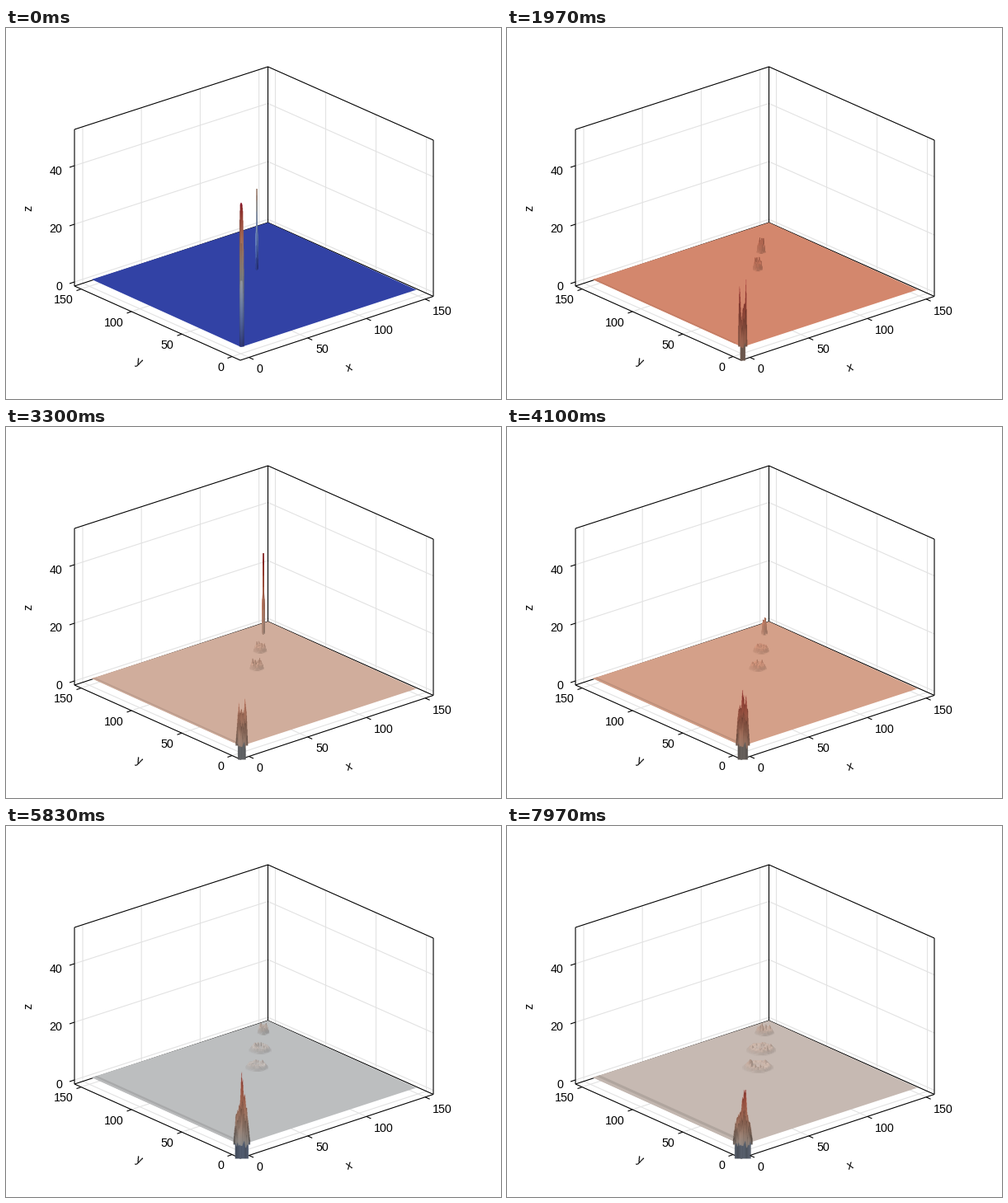
A matplotlib script that plays this animation: 600 px wide and 450 px high, repeating every 8 s.

```python
import numpy as np
import matplotlib as mpl
import matplotlib.pyplot as plt
from matplotlib.animation import FuncAnimation
from matplotlib.collections import PolyCollection

LOOP, FRAMES = 8000, 240
DPI = 100
CMAP = mpl.colormaps["coolwarm"]
LIGHT = 0.86
NEAR, FAR = 4.2, 3.55          # pixels per unit of z, front and back

KEYS = [0, 870, 1970, 3300, 4930, 6730, 7970]
DEPTH = [0, 8.7, 57, 44, 27.6, 19.5, 21.8]     # lowest point of the surface
HALF = [2.8, 5, 5.5, 7.5, 9.5, 11, 12]         # half width of the front peak
FOOT = [0, 2.8, 3.2, 5, 7.5, 9, 10]            # half width of its lower part
PEAKS = np.array([
    [150, 173, 175, 175, 175, 173, 165, 140, 90],
    [5, 30, 113, 142, 114, 113, 90, 25, 5],
    [20, 80, 62, 35, 52, 55, 60, 84, 5],
    [3, 30, 56, 48, 50, 45, 59, 50, 5],
    [4, 42, 48, 62, 107, 75, 66, 40, 4],
    [8, 30, 38, 50, 96, 68, 42, 36, 8],
    [8, 30, 36, 44, 66, 79, 38, 32, 8],
])
DROPS = [(312, 251, 3270), (308, 272, 250), (304, 293, -30)]

rng = np.random.default_rng(7)

fig = plt.figure(figsize=(600 / DPI, 450 / DPI), dpi=DPI, facecolor="white")
ax = fig.add_axes([0, 0, 1, 1])
ax.axis("off")


def px(v):
    return v * 72 / DPI


def line(*pts, color="black", width=1.1, z=1):
    x, y = zip(*pts)
    ax.plot(x, y, color=color, lw=px(width), zorder=z, snap=False,
            solid_capstyle="butt")


def between(a, b, x):
    return a[1] + (b[1] - a[1]) * (x - a[0]) / (b[0] - a[0])


def label(x, y, s, ha="center", rot=0):
    ax.text(x, y, s, ha=ha, va="center_baseline", rotation=rot,
            rotation_mode="anchor" if rot else "default",
            fontsize=px(14.2), family="Liberation Sans", zorder=9)


# box, grid, ticks
TL, TB, TR = (83, 123), (317.5, 47), (518, 136)
BL, BB, BR, BF = (83, 313), (317.5, 236), (518, 325.5), (284, 403)
GRID = "#e2e2e2"


def draw_box():
    for y, yb, yr, s in [(167, 91.5, 180.5, "40"), (238, 162, 251, "20"),
                         (308, 232, 320.5, "0")]:
        line((83, y), (317.5, yb), (518, yr), color=GRID, z=0)
        line((83, y), (77, y + 2), z=8)
        label(68, y + 5, s, "right")
    for i in range(4):
        s = str(50 * i)
        xl, xr = 93 + 71.2 * i, 509.5 - 61 * i
        fx = 294.5 + 71.2 * i
        fy = between(BF, BR, fx)
        gx = 274 - 61 * i
        gy = between(BL, BF, gx)
        yl, yr = between(BL, BB, xl), between(BB, BR, xr)
        line((xl, between(TL, TB, xl)), (xl, yl), (fx, fy), color=GRID, z=0)
        line((xr, between(TB, TR, xr)), (xr, yr), (gx, gy), color=GRID, z=0)
        line((fx, fy), (fx + 5.5, fy + 2.5), z=8)
        line((gx, gy), (gx - 5.5, gy + 2), z=8)
        label(304 + 71 * i, 412 - 23.2 * i, s, "left")
        label(264.5 - 61 * i, 410.5 - 27.2 * i, s, "right")
    line(TL, TB, TR)
    line(TL, BL)
    line(TB, BB)
    line(TR, BR)
    line(BL, BB, BR)
    line(BL, BF, BR)
    label(25.5, 218, "z", rot=90)
    label(162, 404, "y", rot=-24)
    label(416, 411, "x", rot=18)


draw_box()

# flat surface and the ripple along its left edge
LEFT, FRONT = np.array([104, 305.0]), np.array([285, 387.0])
floor = plt.Polygon([LEFT, (317.5, 236), (497.5, 317.5), FRONT], lw=0, zorder=2)
bands = [plt.Polygon([LEFT, FRONT, FRONT], lw=0, zorder=2.5) for _ in range(2)]
for patch in [floor, *bands]:
    ax.add_patch(patch)

# expanding rings: a smooth rim around a jagged crown
U, V = np.meshgrid(np.linspace(-1, 1, 25), np.linspace(-1, 1, 15))
RHO = np.hypot(U, V)
RIM = np.clip((1.02 - RHO) / 0.3, 0, 1)
RIM = RIM * RIM * (3 - 2 * RIM)
CROWN = np.exp(-((RHO - 0.52) / 0.2) ** 2)
CONE = np.clip(1 - RHO, 0, 1)
BOWL = np.exp(-(RHO / 0.4) ** 2)
NOISE = rng.random((len(DROPS), len(KEYS), *U.shape))
NOISE = (2 * NOISE + np.roll(NOISE, 1, -1) + np.roll(NOISE, 1, -2)) / 4
NOISE = (NOISE / NOISE.max()) ** 3
rings = []
for k in range(len(DROPS)):
    ring = PolyCollection([], linewidths=0.3, zorder=3 + 0.1 * k)
    ax.add_collection(ring)
    rings.append(ring)

# front peak, painted column by column in three layers
X0, X1, Y0, Y1 = 269.5, 301.5, 205, 406
XS = np.linspace(X0, X1, 96)
YS = np.linspace(Y0, Y1, 402)[:, None]
DX = XS - 285.3
STREAK = np.interp(XS, np.linspace(X0, X1, 40), rng.random(40))
JAG = 9 * np.interp(XS, np.linspace(X0, X1, 28), rng.random(28)) - 5
LAYERS = [(1, 0.86), (0.72, 0.78), (0.46, 0.9)]   # share of height, tone
BROWN = np.array([0.5, 0.42, 0.36])
peak = ax.imshow(np.zeros((402, 96, 4)), extent=(X0, X1, Y1, Y0),
                 aspect="auto", zorder=4)

ax.set_xlim(0, 600)
ax.set_ylim(450, 0)


def blend(table, t):
    p = np.interp(t, KEYS, range(len(KEYS)))
    i = min(int(p), len(KEYS) - 2)
    return table[i] * (1 - p + i) + table[i + 1] * (p - i)


def drop_height(age):
    if age < 0:
        return 0
    return 10 + 32 * np.exp(-age / 2000) + 61 * np.exp(-max(0, age - 120) / 150)


def draw_ring(k, t, level, scale):
    cx, cy, birth = DROPS[k]
    age = t - birth
    tall = drop_height(age)
    r = 1.5 + 0.0021 * age if age >= 0 else 0
    young = np.exp(-max(age, 0) / 600)
    crater = 0.36 * RIM + 0.75 * CROWN * blend(NOISE[k], t) - 0.3 * BOWL
    h = tall * (young * CONE + (1 - young) * crater)
    pts = np.stack([cx + r * U, cy + 0.34 * r * V - h], axis=-1)
    quads = np.stack([pts[:-1, :-1], pts[:-1, 1:], pts[1:, 1:], pts[1:, :-1]], 2)
    mid = (h[:-1, :-1] + h[1:, 1:] + h[:-1, 1:] + h[1:, :-1]) / 4
    gx = h[:-1, 1:] - h[:-1, :-1]
    gy = h[1:, :-1] - h[:-1, :-1]
    shade = (1 + 0.06 * RIM[:-1, :-1] - 0.26 * np.tanh(np.hypot(gx, gy) / 4)
             + 0.08 * np.tanh(gx / 3))
    rgb = CMAP(level + mid / FAR * scale)[..., :3] * (LIGHT * shade)[..., None]
    rgb = np.clip(rgb, 0, 1).reshape(-1, 3)
    rings[k].set_verts(quads.reshape(-1, 4, 2))
    rings[k].set_facecolor(rgb)
    rings[k].set_edgecolor(rgb)


def draw_peak(t, tops, level, scale):
    half, foot = np.interp(t, KEYS, HALF), np.interp(t, KEYS, FOOT)
    nodes = half * np.linspace(-1, 1, len(tops))
    hull = np.interp(DX, nodes, tops, left=0, right=0)
    rough = min(t / 3000, 1)
    tone = np.ones((len(YS), len(XS)))
    for j, (share, shade) in enumerate(LAYERS):
        spikes = np.roll(STREAK, 5 * j)
        top = 387 - hull * share * (1 - (0.2 + 0.2 * j) * rough * spikes)
        if j == 0:
            outline = top
        edge = np.exp(-np.abs(YS - top) / 3)
        layer = (shade - 0.14 * spikes) * (1 - 0.25 * rough * edge)
        tone = np.where(YS > top, layer, tone)
    tone = tone * (1 - 0.3 * np.clip(np.abs(DX) / half, 0, 1) ** 4)
    tone = tone * np.interp(YS, [387 - tops.max(), 387], [1, 0.8])

    low = np.abs(DX) < foot
    if t < 1400:
        low &= STREAK > 0.45
    bottom = np.where(low, 403.5, 386.5)
    img = CMAP(np.clip(level + (387 - YS) / NEAR * scale + 0 * DX, 0, 1))
    rgb = (0.82 * img[..., :3] + 0.18 * BROWN) * tone[..., None]
    under = np.array(CMAP(max(level - 0.12, 0))[:3]) * 0.42
    dark = (YS > 387 + JAG) & (t > 300)
    img[..., :3] = np.where(dark[..., None],
                            under * (0.85 + 0.3 * STREAK)[None, :, None], rgb)
    img[..., 3] = (np.abs(DX) < half) & (YS > outline) & (YS < bottom)
    peak.set_data(np.clip(img, 0, 1))


def update(i):
    t = i * LOOP / FRAMES
    tops = blend(PEAKS, t)
    high = max(tops.max() / NEAR,
               *(drop_height(t - birth) / FAR for *_, birth in DROPS))
    depth = np.interp(t, KEYS, DEPTH)
    level = depth / (depth + high)
    scale = 1 / (depth + high)
    base = np.array(CMAP(level)[:3]) * LIGHT
    floor.set_facecolor(base)

    reach = 6 * t / LOOP
    step = np.array([1.42, -0.47])
    end = LEFT + 0.95 * (FRONT - LEFT)
    for patch, a, b, shade in zip(bands, (0, 0.5), (0.5, 1), (0.98, 0.89)):
        a, b = a * reach * step, b * reach * step
        patch.set_xy([LEFT + a, end + a, end + b, LEFT + b])
        patch.set_facecolor(base * shade)

    for k in range(len(DROPS)):
        draw_ring(k, t, level, scale)
    draw_peak(t, tops, level, scale)
    return [floor, *bands, *rings, peak]


anim = FuncAnimation(fig, update, frames=FRAMES, interval=LOOP / FRAMES,
                     repeat=True, repeat_delay=0, blit=False)
plt.show()
```
